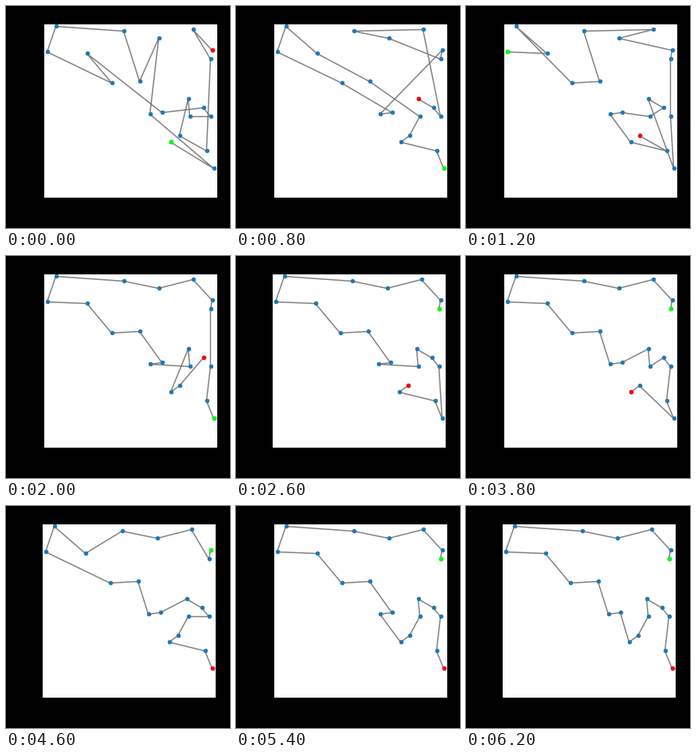
These frames come from a looping animation (281x278 px, 8 s). A matplotlib script:

```python
import matplotlib.pyplot as plt
from matplotlib.animation import FuncAnimation
from matplotlib.patches import Rectangle
import numpy as np

W, H, DPI = 281, 278, 72
STEP = 200  # ms per frame
FRAMES = 40

# City positions in stage pixels, one letter each
CITIES = dict(
    a=(62, 25), b=(51, 57), c=(101, 59), d=(132, 96), e=(147, 31),
    f=(167, 94), g=(191, 40), h=(180, 135), i=(195, 133), j=(234, 29),
    k=(258, 55), l=(256, 66), m=(228, 116), n=(230, 138), o=(247, 127),
    p=(256, 138), q=(217, 162), r=(206, 170), s=(251, 181), t=(260, 203),
)

# (start in ms, visiting order, horizontal offset of the plot)
TOURS = [
    (0, "rthgfeabdciopnmqsljk", 0),
    (200, "rtihfegacbdopnmqsljk", 0),
    (400, "qrthifegabcdopnmsljk", 0),
    (600, "bcadihklgejpomfnqrts", 0),
    (800, "tsrqnfcabdihklgejpom", 0),
    (1000, "srqnmtlkjgeabcfdihop", 0),
    (1200, "bcadfejgklptmonihrsq", 0),
    (1600, "qrsihnomtplkjgefdcab", 0),
    (1800, "bcafdegjklptsqrmonhi", 0),
    (2000, "tsplkjgeabcdfihnmrqo", 0),
    (2200, "tsplkjgeabcdfihnmoqr", -2),
    (2400, "lkjgeabcdfihnmoptsqr", 0),
    (2600, "lkjgeabcdfihnmoptsrq", -2),
    (3000, "lkjgeabcdfihnmopstrq", 0),
    (3200, "lkjgeabcdfhinmopstrq", -2),
    (3800, "lkjgeabcdfhimnopstqr", 0),
    (4200, "lkjgeacbdfhimopnrqst", -2),
    (4600, "kljgecabdfhimopnqrst", -2),
    (5000, "kljgecabdfhimnopqrst", 0),
    (5400, "lkjgeabcdfihrqnmopst", 0),
    (6200, "lkjgeabcdfhirqnmopst", -2),
]

fig = plt.figure(figsize=((W + 0.01) / DPI, (H + 0.01) / DPI), dpi=DPI,
                 facecolor="black")
ax = fig.add_axes([0, 0, 1, 1])
ax.set_xlim(0, W)
ax.set_ylim(H, 0)
ax.axis("off")

panel = ax.add_patch(Rectangle((48, 23), 217, 217, fc="white", lw=0))
route, = ax.plot([], [], color="gray", lw=1.5, zorder=2)


def dots(color, z):
    return ax.scatter([], [], s=20, color=color, zorder=z)


stops = dots("tab:blue", 3)
first = dots("lime", 4)
last = dots("red", 4)
for artist in (route, stops, first, last):
    artist.set_clip_path(panel)


def update(frame):
    now = frame * STEP
    _, order, shift = [tour for tour in TOURS if tour[0] <= now][-1]
    xy = np.array([CITIES[name] for name in order]) + (shift + 0.5, 0.5)
    panel.set_x(48 + shift)
    for artist in (route, stops, first, last):
        artist.set_clip_path(panel)
    route.set_data(xy[:, 0], xy[:, 1])
    stops.set_offsets(xy)
    first.set_offsets(xy[:1])
    last.set_offsets(xy[-1:])
    return panel, route, stops, first, last


anim = FuncAnimation(fig, update, frames=FRAMES, interval=STEP,
                     repeat=True, repeat_delay=0)
plt.show()
```
